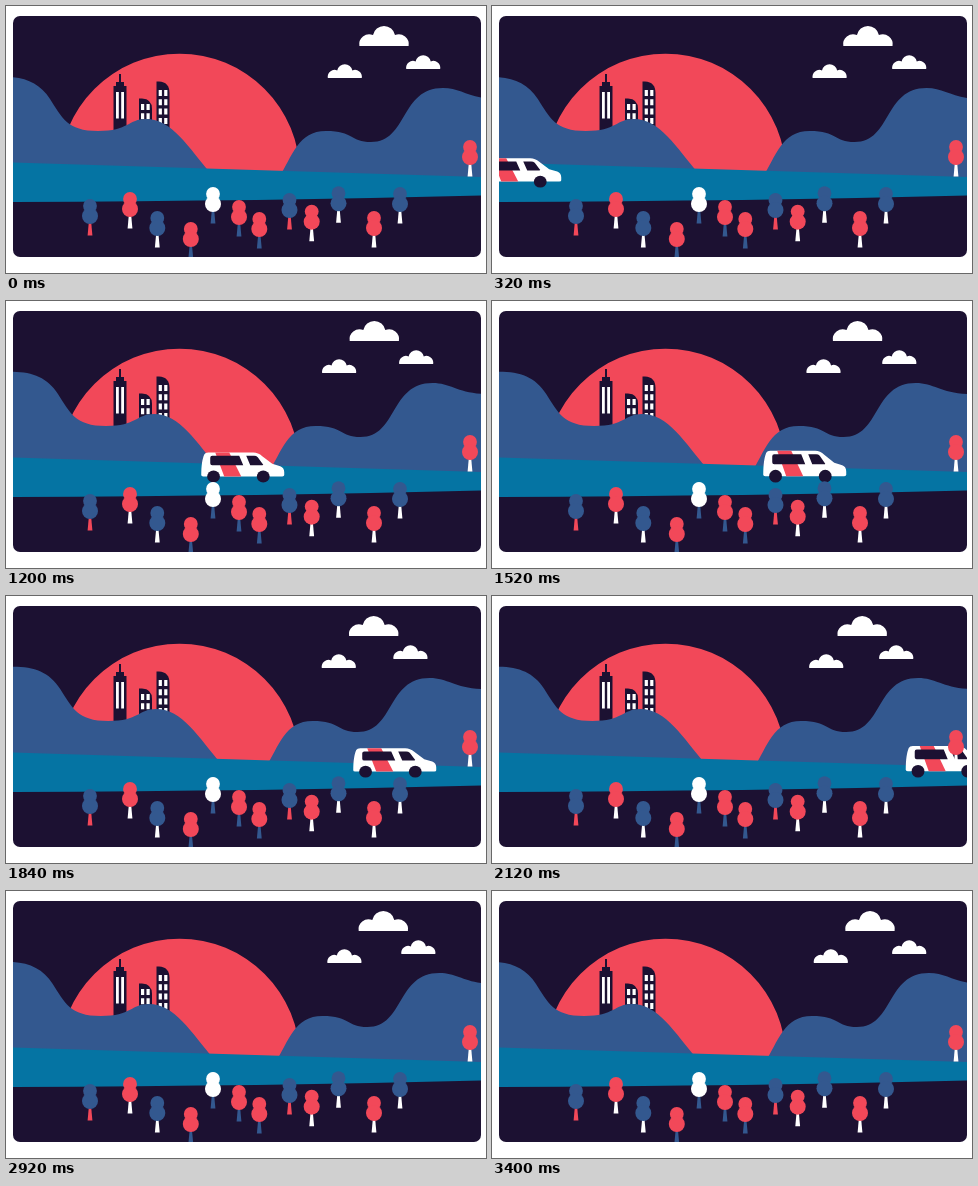
An HTML page that plays this animation: 480x267 px, repeating every 3.48 s.

```html
<!DOCTYPE html>
<html lang="en">
<head>
<meta charset="utf-8">
<title>Evening drive</title>
<style>
  html, body { margin: 0; height: 100%; overflow: hidden; background: #fff; }
  svg { display: block; width: 100vw; height: 100vh; }
  .night { fill: #1c1132; }
  .red { fill: #f24859; }
  .blue { fill: #33588f; }
  .white { fill: #fff; }
  .road { fill: #0574a3; }
</style>
</head>
<body>
<svg viewBox="0 0 480 267">
  <defs>
    <clipPath id="card"><rect x="7" y="10" width="468" height="241" rx="7"/></clipPath>
    <path id="cloud" class="white" d="M-24.6 0A10 10 0 0 1 -11 -11A11.2 11.2 0 0 1 11 -11A10 10 0 0 1 24.6 0z"/>
  </defs>
  <g clip-path="url(#card)">
    <rect class="night" width="480" height="267"/>
    <path class="red" d="M53.1 168A120.4 120.4 0 0 1 293.9 168z"/>

    <g class="night">
      <path d="M107.5 130V80H110V76H113V68H115V76H118V80H120.5V130z"/>
      <path d="M133 130V92.5H136Q146 93 146 103V130z"/>
      <path d="M150.5 130V75.5H153Q163.5 76 163.5 87V130z"/>
    </g>
    <path class="white" d="M110 86h2.8v26.5h-2.8zM115.2 86h2.8v26.5h-2.8z"/>
    <g id="windows" class="white"></g>

    <path id="leftHill" class="blue" d="M-20 71H-10C15 69.8 32 74.5 44 93S61 125 92 125S122 113 140 113C166 113 182 141 206 169V180H-20z"/>
    <path id="rightHill" class="blue" d="M272.6 172C286.6 150 292 125 320 125S344 136 365 136C402 136 394 82 437 82C455 82 462 92 489 93V182H272z"/>
    <path class="road" d="M7 156.6L475 171V189.5Q260 195 7 196z"/>

    <use id="bigCloud" href="#cloud"/>
    <use id="rightCloud" href="#cloud"/>
    <use id="leftCloud" href="#cloud"/>

    <g id="van">
      <path class="white" d="M0 -8C0 -18 1 -25 3 -30Q4 -32 7 -32H52Q57 -32 61 -28L71 -20L79 -17.5Q83 -16 83 -11V-8Q83 -6.5 81 -6.5H2Q0 -6.5 0 -8z"/>
      <path class="red" d="M14 -32H28L40 -6.5H23z"/>
      <path class="night" d="M11 -28.5H38L42 -18.5H11Q9 -18.5 9 -20.5V-26.5Q9 -28.5 11 -28.5zM45 -28.5H53Q55 -28.5 56.5 -27L62 -19Q62 -18.5 61 -18.5H49z"/>
      <circle class="night" cx="12.3" cy="-6.4" r="6.4"/>
      <circle class="night" cx="62" cy="-6.4" r="6.4"/>
    </g>
    <g id="trees"></g>
  </g>
</svg>
<script>
const LOOP = 3480;
const $ = id => document.getElementById(id);
const move = (id, x, y, scale = "1") =>
  $(id).setAttribute("transform", `translate(${x} ${y}) scale(${scale})`);

// Each tree: centre, top, crown colour, trunk colour
const trees = [
  [464, 134, "red", "white"], [84, 193, "blue", "red"], [124, 186, "red", "white"],
  [151.3, 205, "blue", "white"], [184.8, 216, "red", "blue"], [207, 181, "white", "blue"],
  [233, 194, "red", "blue"], [253.3, 206, "red", "blue"], [283.5, 187, "blue", "red"],
  [305.7, 198.7, "red", "white"], [332.5, 180.3, "blue", "white"],
  [368, 205, "red", "white"], [394, 181, "blue", "white"]
];
$("trees").innerHTML = trees.map(([x, y, crown, trunk]) =>
  `<g transform="translate(${x} ${y})">
    <path class="${trunk}" d="M-.9 20H.9L2.4 36.5H-2.4z"/>
    <g class="${crown}"><circle cy="6.9" r="6.9"/><circle cy="17" r="8"/></g>
  </g>`).join("");

function windowGrid(x, y, rows) {
  let d = "";
  for (let r = 0; r < rows; r++)
    for (const dx of [0, 5.5]) d += `M${x + dx} ${y + r * 9.3}h3.2v6h-3.2z`;
  return `<path d="${d}"/>`;
}
$("windows").innerHTML = windowGrid(135, 98, 2) + windowGrid(152.7, 84, 4);

// Rises from 0 to 1 at the peak, then falls back to 0
const swing = (t, start, peak, end) =>
  Math.max(0, Math.min((t - start) / (peak - start), (end - t) / (end - peak)));

function draw(now) {
  const t = now % LOOP;
  const hill = swing(t, 60, 1680, 3320);
  const sky = swing(t, 80, 1560, 3000);
  move("leftHill", 11.3 * hill, 0);
  move("rightHill", -14.8 * hill, 0);
  move("bigCloud", 378 - 12.8 * sky, 40);
  move("leftCloud", 338.8 - 7.5 * sky, 72, .69);
  move("rightCloud", 417.2 - 14.2 * swing(t, 420, 2000, 3400), 63, .69);

  const squash = 1 - .04 * (1 + Math.cos((t - 320) / 760 * 2 * Math.PI));
  move("van", -90 + .2375 * t, 181.6, `1 ${squash}`);
  requestAnimationFrame(draw);
}
requestAnimationFrame(draw);
</script>
</body>
</html>
```
